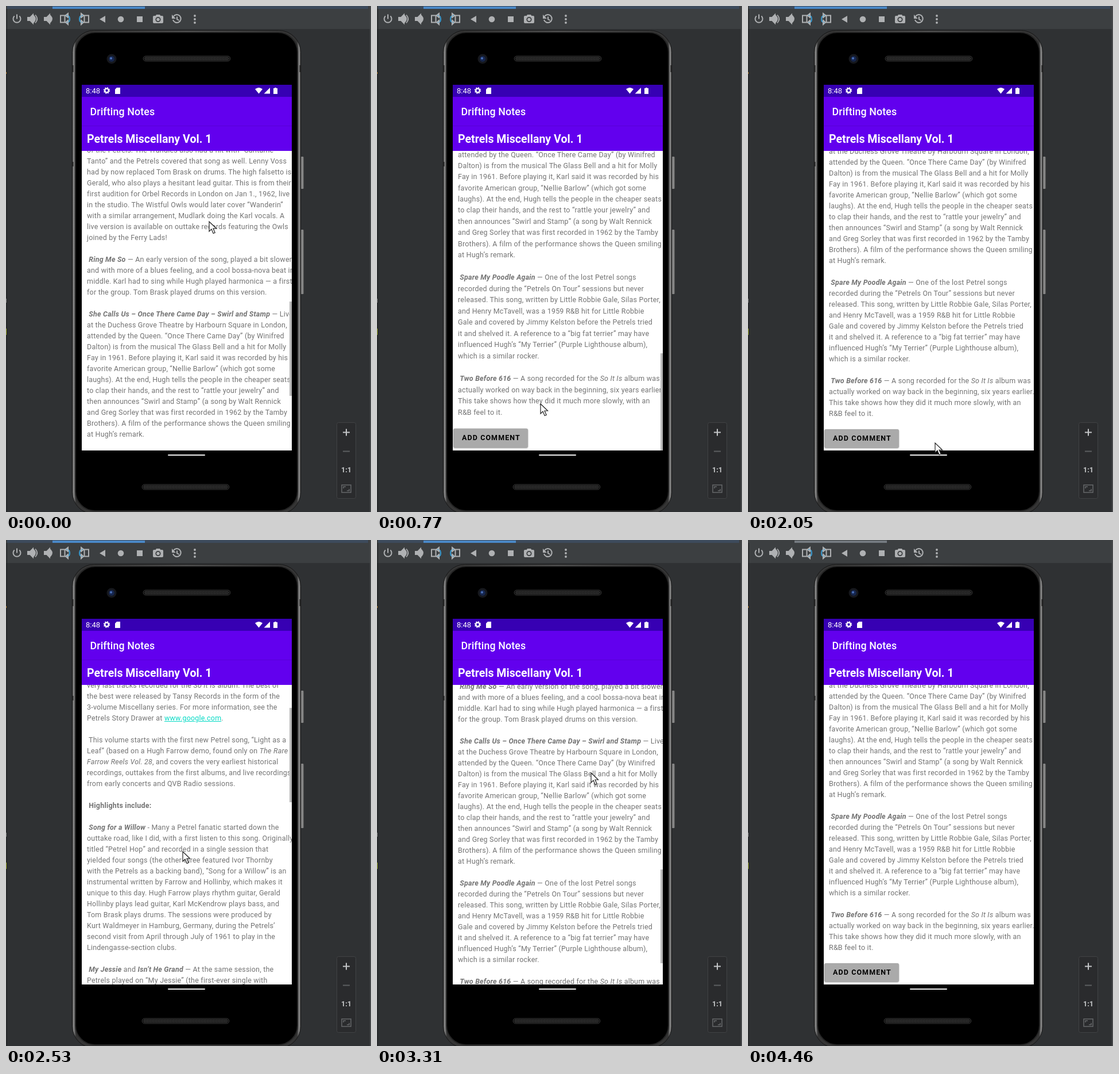
Recreate the animation shown at these times as an HTML page. Size 636x880 px, loop 4.56 s.

```html
<!DOCTYPE html>
<html lang="en">
<head>
<meta charset="utf-8">
<title>Drifting Notes</title>
<style>
html, body { margin: 0; width: 100%; height: 100%; overflow: hidden; background: #2f3133; }
body { position: relative; font-family: Roboto, sans-serif; }
svg { position: absolute; left: 0; top: 0; }
#view { position: absolute; left: 132px; top: 252px; width: 366px; height: 521px; overflow: hidden; background: #fff; }
#view div { position: absolute; }
.line { left: 9px; top: -10px; height: 20px; font-size: 12.46px; line-height: 20px; letter-spacing: .0178em; white-space: pre; color: #737373; }
.lead { color: #212121; }
.line u { color: #03dac5; }
#add { left: 1px; top: -16px; width: 130px; height: 32px; border-radius: 3px; background: #aaa; color: #000; box-shadow: 0 1px 2px #0007; font: 700 12.46px/32px Roboto, sans-serif; letter-spacing: .0893em; text-indent: 15px; white-space: pre; }
#thumb { right: 0; top: 0; width: 4px; background: #bababa; }
</style>
</head>
<body>
<svg width="636" height="880" viewBox="0 0 636 880" font-family="Roboto, sans-serif" fill="none">
  <defs>
    <linearGradient id="metal">
      <stop offset="0" stop-color="#4a4a4a"/><stop offset=".006" stop-color="#8c8c8c"/><stop offset=".016" stop-color="#333"/>
      <stop offset=".5" stop-color="#555"/>
      <stop offset=".984" stop-color="#333"/><stop offset=".994" stop-color="#8c8c8c"/><stop offset="1" stop-color="#4a4a4a"/>
    </linearGradient>
    <linearGradient id="key"><stop stop-color="#444"/><stop offset=".5" stop-color="#999"/><stop offset="1" stop-color="#555"/></linearGradient>
    <g id="grille">
      <rect width="152" height="9" rx="4.5" fill="#161616" stroke="#303030"/>
      <path d="M4 2.5h145M3 4.5h147M4 6.5h145" stroke="#5a5a5a" stroke-dasharray="1.2 1.3"/>
    </g>
    <g id="turn">
      <rect x="95" y="16.5" width="7.5" height="12" stroke="#afb1b3" stroke-width="2"/>
      <path d="M105 16.5c4 0 6 2 6 6s-2 6-5 6" stroke="#3b9fd6" stroke-width="2"/>
      <path d="M108 13v7l-4.500-3.500zM104 28.500l4-3.500v7z" fill="#3b9fd6"/>
    </g>
    <path id="horn" d="M38 20h4l5-5v15l-5-5h-4zM49 18q4 4.500 0 9z" fill="#afb1b3"/>
  </defs>

  <path fill="#3c3f41" d="M0 0h636v40H0z"/>
  <path id="strip" d="M2 0h629v5H2z"/>
  <path id="tab" d="M81 1h161v4H81z"/>
  <path fill="#47494b" d="M634 0h2v880h-2z"/>
  <path fill="#222426" d="M1 5h1v875H1z"/>
  <path fill="#c78a32" d="M0 115h1v3H0z"/>
  <path fill="#888" d="M0 509h1v7H0z"/>
  <path fill="#a5b32e" d="M0 561h1v11H0z"/>

  <g stroke="#afb1b3" stroke-width="2">
    <path d="M14.700 17.500a6.500 6.500 0 1 0 8.600 0M19 14.500v8"/>
    <use href="#horn"/><path d="M51 15.500q6.500 7 0 14" stroke-width="1.700"/>
    <use href="#horn" x="29"/>
    <use href="#turn"/><use href="#turn" transform="matrix(-1 0 0 1 239 0)"/>
    <path d="M292 18a7 7 0 1 1-1 6M298 18.500v4.500l3.500 2"/>
  </g>
  <g fill="#afb1b3">
    <path d="M173 17v12l-10-6zM228 18h10v10h-10zM289 15v7h7z"/>
    <circle cx="200" cy="23" r="5.300"/>
    <rect x="256" y="17" width="18" height="13" rx="2"/><path d="M260 18l2-3h6l2 3z"/>
    <circle cx="329" cy="17" r="1.900"/><circle cx="329" cy="23" r="1.900"/><circle cx="329" cy="29" r="1.900"/>
  </g>
  <circle cx="265" cy="23.500" r="3.700" stroke="#3c3f41" stroke-width="1.800"/>

  <rect x="513" y="262" width="6" height="56" rx="1.500" fill="url(#key)"/>
  <rect x="513" y="389" width="6" height="112" rx="1.500" fill="url(#key)"/>
  <rect x="115.500" y="42.500" width="398" height="841" rx="38" fill="url(#metal)" stroke="#161616"/>
  <path d="M116 103v12M116 271v8M513 103v12" stroke="#222" stroke-width="3"/>
  <rect x="121" y="46" width="387" height="832" rx="34" fill="#000" stroke="#242424" stroke-width="2"/>
  <circle cx="184" cy="92" r="8.500" fill="#16181d"/>
  <circle cx="184" cy="92" r="5" fill="#16264e"/>
  <circle cx="183" cy="91" r="2" fill="#4a70b8"/>
  <use href="#grille" x="239" y="87"/><use href="#grille" x="237" y="832"/>
  <path d="M283 781h63" stroke="#eee" stroke-width="2" stroke-linecap="round"/>

  <path fill="#3700b3" d="M132 137h366v21H132z"/>
  <path fill="#6200ee" d="M132 158h366v95H132z"/>
  <path d="M132 208.500h366" stroke="#5800d8"/>
  <g fill="#fff">
    <text x="139" y="152" font-size="13">8:48</text>
    <text x="146.500" y="189.500" font-size="17.790" font-weight="500" letter-spacing=".130">Drifting Notes</text>
    <text x="141" y="238" font-size="19.570" font-weight="700">Petrels Miscellany Vol. 1</text>
    <path d="M193 142h6v11h-9v-8zM434 144.500q6.500-5 13 0l-6.500 8zM460 142v10.500h-10.500zM466 143h2v-1h3v1h2v10h-7z"/>
  </g>
  <g stroke="#fff"><circle cx="175.500" cy="147" r="3.300" stroke-width="2.300"/><circle cx="175.500" cy="147" r="4.900" stroke-width="1.600" stroke-dasharray="2 1.850"/></g>

  <rect x="576.500" y="724.500" width="33" height="132" rx="3" fill="#2a2b2d" stroke="#414345"/>
  <path d="M587 741.500h12M593 735.500v12" stroke="#c4c6c8" stroke-width="2"/>
  <path d="M587 774.500h12" stroke="#5c5e60" stroke-width="2"/>
  <text x="593" y="810.500" font-size="12.500" font-weight="700" fill="#c4c6c8" text-anchor="middle">1:1</text>
  <path d="M585 833h16v13h-16zM588 839v-3h4M598 840v3h-4" stroke="#66686a" stroke-width="1.500"/>
</svg>

<div id="view"></div>

<svg width="636" height="880"><path id="cursor" d="M0 0v17l4-4 3.200 7.500 3-1.300-3.200-7.200h5.500z" fill="#fff" stroke="#222" stroke-width="1.200"/></svg>

<script>
// *bold italic*, _italic_
const text = `In a vault deep inside Marsh Lane Studios in London —
protected by an unmarked, triple-locked, police-alarmed
door — are something like 400 hours of unreleased Petrels
recordings, starting from June 2, 1962 and ending with the
very last tracks recorded for the _So It Is_ album. The best of
the best were released by Tansy Records in the form of the
3-volume Miscellany series. For more information, see the
Petrels Story Drawer at <u>www.google.com</u>.

 This volume starts with the first new Petrel song, “Light as a
Leaf” (based on a Hugh Farrow demo, found only on _The Rare_
_Farrow Reels Vol. 28_, and covers the very earliest historical
recordings, outtakes from the first albums, and live recordings
from early concerts and QVB Radio sessions.

 <b>Highlights include:</b>

 *Song for a Willow* - Many a Petrel fanatic started down the
outtake road, like I did, with a first listen to this song. Originally
titled “Petrel Hop” and recorded in a single session that
yielded four songs (the other three featured Ivor Thornby
with the Petrels as a backing band), “Song for a Willow” is an
instrumental written by Farrow and Hollinby, which makes it
unique to this day. Hugh Farrow plays rhythm guitar, Gerald
Hollinby plays lead guitar, Karl McKendrow plays bass, and
Tom Brask plays drums. The sessions were produced by
Kurt Waldmeyer in Hamburg, Germany, during the Petrels’
second visit from April through July of 1961 to play in the
Lindengasse-section clubs.

 *My Jessie* and *Isn’t He Grand* — At the same session, the
Petrels played on “My Jessie” (the first-ever single with
Petrels playing), as the backing band for English singer
Ivor Thornby, originally recorded in June 1961. Later in the
session Hugh Farrow led the band through a bluesy version
of “Isn’t He Grand”, with a slower beat and a rough edge
that the group had learned on stage.

 *Wanderin* — A comedy song that was a hit for the Trundles
in 1957. It soon became a popular live number in the clubs
and stayed for years in the early stage act, a big favorite
of the Petrels. The Trundles also had a hit with “Cántame
Tanto” and the Petrels covered that song as well. Lenny Voss
had by now replaced Tom Brask on drums. The high falsetto is
Gerald, who also plays a hesitant lead guitar. This is from their
first audition for Orbel Records in London on Jan 1., 1962, live
in the studio. The Wistful Owls would later cover “Wanderin”
with a similar arrangement, Mudlark doing the Karl vocals. A
live version is available on outtake records featuring the Owls
joined by the Ferry Lads!

 *Ring Me So* — An early version of the song, played a bit slower
and with more of a blues feeling, and a cool bossa-nova beat in
middle. Karl had to sing while Hugh played harmonica — a first
for the group. Tom Brask played drums on this version.

 *She Calls Us – Once There Came Day – Swirl and Stamp* — Live
at the Duchess Grove Theatre by Harbourn Square in London,
attended by the Queen. “Once There Came Day” (by Winifred
Dalton) is from the musical The Glass Bell and a hit for Molly
Fay in 1961. Before playing it, Karl said it was recorded by his
favorite American group, “Nellie Barlow” (which got some
laughs). At the end, Hugh tells the people in the cheaper seats
to clap their hands, and the rest to “rattle your jewelry” and
then announces “Swirl and Stamp” (a song by Walt Rennick
and Greg Sorley that was first recorded in 1962 by the Tamby
Brothers). A film of the performance shows the Queen smiling
at Hugh’s remark.

 *Spare My Poodle Again* — One of the lost Petrel songs
recorded during the “Petrels On Tour” sessions but never
released. This song, written by Little Robbie Gale, Silas Porter,
and Henry McTavell, was a 1959 R&amp;B hit for Little Robbie
Gale and covered by Jimmy Kelston before the Petrels tried
it and shelved it. A reference to a “big fat terrier” may have
influenced Hugh’s “My Terrier” (Purple Lighthouse album),
which is a similar rocker.

 *Two Before 616* — A song recorded for the _So It Is_ album was
actually worked on way back in the beginning, six years earlier.
This take shows how they did it much more slowly, with an
R&amp;B feel to it.`;

const loop = 4560, viewH = 521, maxScroll = 1135;
const thumbH = viewH * viewH / (viewH + maxScroll);
const $ = id => document.getElementById(id);
const view = $('view'), items = [];

function add(html, y, cls, id = '') {
  const el = document.createElement('div');
  el.innerHTML = html;
  el.className = cls;
  el.id = id;
  view.append(el);
  items.push({ el, y });
}
add('Beyond This Hidden Gate: Petrels Rarities!', 18, 'line lead');
text.split('\n').forEach((s, i) => s && add(
  s.replace(/\*(.+?)\*/g, '<b><i>$1</i></b>').replace(/_(.+?)_/g, '<i>$1</i>'), 53 + 19 * i, 'line'));
add('ADD COMMENT', 1635, '', 'add');
const thumb = document.createElement('div');
thumb.id = 'thumb';
view.append(thumb);

// runs of 120 ms steps: start, count
const runs = [[0, 3], [390, 1], [530, 5], [1160, 2], [1420, 5], [2050, 5], [2670, 1], [2810, 2], [3070, 5], [3670, 4], [4460, 1]];
const scroll = [[0, 833], [120, 1010], [240, 1132], [390, 1135], [2170, 1135], [2290, 1110], [2410, 700], [2530, 128], [2670, 0],
  [3070, 0], [3190, 380], [3310, 1019], [3430, 1128], [3550, 1135]];
// positive pulls from the top edge, negative from the bottom
const stretch = [[240, 0], [390, -.02], [650, -.025], [770, -.037], [890, -.037], [1010, -.02], [1160, -.006], [1280, 0],
  [2530, 0], [2670, .03], [2810, .037], [2930, .012], [3070, 0], [3430, 0], [3550, -.02], [3670, -.006], [3790, 0]];
const barAlpha = [[1420, 1], [1780, 0], [2170, 0], [2290, 1], [3670, 1], [4030, 0]];
const pointer = [[0, 354, 375], [120, 350, 300], [240, 335, 290], [390, 320, 430], [530, 305, 620], [650, 290, 735], [770, 285, 692],
  [1010, 295, 600], [1160, 298, 690], [1280, 290, 766], [1540, 240, 640], [1660, 200, 730], [1780, 185, 752], [1900, 240, 800],
  [2050, 326, 760], [2170, 300, 480], [2290, 290, 330], [2530, 308, 542], [2670, 312, 640], [2810, 315, 692], [2930, 322, 735],
  [3070, 335, 690], [3310, 373, 405], [3430, 390, 145], [3550, 410, 260], [3910, 530, 740], [4030, 560, 900]];

function at(keys, t, c = 1) {
  const n = keys.findIndex(k => k[0] > t);
  if (n < 0) return keys[keys.length - 1][c];
  if (!n) return keys[0][c];
  const a = keys[n - 1], b = keys[n];
  return a[c] + (b[c] - a[c]) * (t - a[0]) / (b[0] - a[0]);
}

function step(t) {
  const [start, count] = runs.filter(r => r[0] <= t).pop();
  return start + 120 * Math.min(count - 1, Math.floor((t - start) / 120));
}

function warp(y, k) {
  const pull = u => u + Math.abs(k) * (u - u * u / 1800);
  return k < 0 ? viewH - pull(viewH - y) : pull(y);
}

function draw() {
  const t = step(performance.now() % loop);
  const s = at(scroll, t), k = at(stretch, t);
  for (const { el, y } of items) {
    const u = y - s, shown = u > -30 && u < viewH + 30;
    el.style.display = shown ? '' : 'none';
    if (!shown) continue;
    const scale = 1 + Math.abs(k) * (1 - (k < 0 ? viewH - u : u) / 900);
    el.style.transform = `translateY(${warp(u, k)}px)` + (k ? ` scaleY(${scale})` : '');
  }
  const top = s / maxScroll * (viewH - thumbH), y0 = warp(top, k);
  thumb.style.top = y0 + 'px';
  thumb.style.height = warp(top + thumbH, k) - y0 + 'px';
  thumb.style.opacity = at(barAlpha, t);
  $('cursor').setAttribute('transform', `translate(${at(pointer, t)} ${at(pointer, t, 2)})`);
  const focused = t < 4460;
  $('strip').setAttribute('fill', focused ? '#3d4b5c' : '#3c3f41');
  $('tab').setAttribute('fill', focused ? '#4a88c7' : '#747a80');
  requestAnimationFrame(draw);
}
draw();
</script>
</body>
</html>
```
